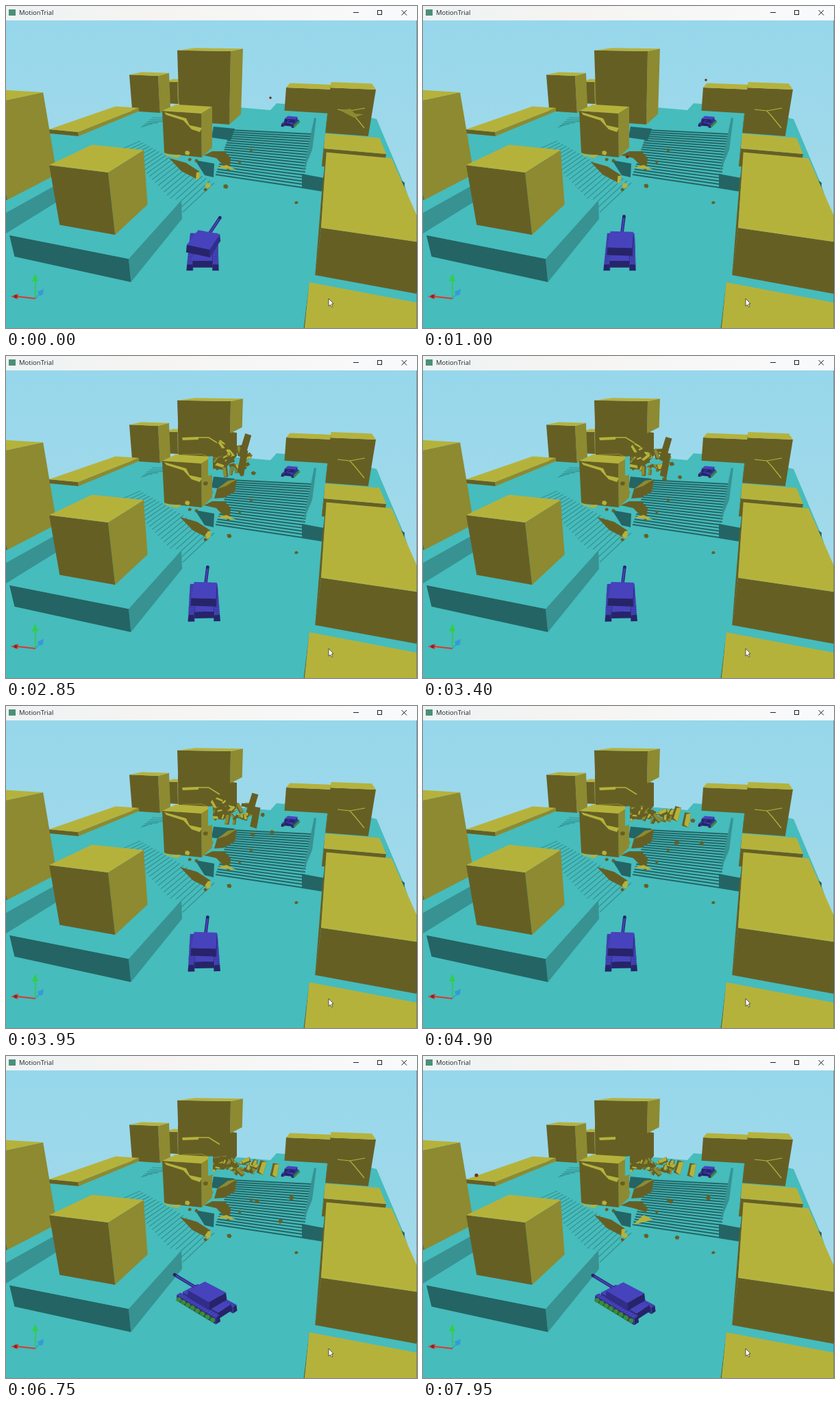
These frames come from a looping animation (600 by 470 pixels, 8 s). An HTML page with a canvas:

```html
<!DOCTYPE html>
<html lang="en">
<head>
<meta charset="utf-8">
<title>MotionTrial</title>
<style>
html, body { margin: 0; width: 100%; height: 100%; overflow: hidden; background: #9ad8ea; }
canvas { display: block; width: 600px; height: 470px; }
</style>
</head>
<body>
<canvas id="stage" width="600" height="470"></canvas>
<script>
const ctx = document.getElementById('stage').getContext('2d');
const LOOP = 8000, STEP = 50, HIT = 1500;
const LIGHT = '#b5b23c', MID = '#8d8a31', DARK = '#665f24';
const TEAL = '#46bcbc', TEAL_MID = '#389292', TEAL_DARK = '#246464';
const BLUE = '#4743bd', BLUE_MID = '#312e8a', BLUE_DARK = '#27246a', GREEN = '#3b8b35';
const SHELL = '#71301f';
const OLIVE = [LIGHT, DARK, MID], GROUND = [TEAL, TEAL_DARK, TEAL_MID], ARMOUR = [BLUE, BLUE_DARK, BLUE_MID];

// One camera for the whole scene: image centre, focal length, pitch and the
// vanishing points of depth, width and height.
const CX = 300, CY = 245, FOCAL = 529, PITCH = Math.atan(210 / FOCAL);
const SIN = Math.sin(PITCH), COS = Math.cos(PITCH);
const FAR = [480, 35], LEFT = [-1500, 35], DOWN = [300, 1580];

const clamp = v => Math.max(0, Math.min(1, v));
const mix = (a, b, p) => a + (b - a) * p;
const between = (a, b, p) => a.map((v, i) => mix(v, b[i], p));
const span = (t, from, to) => clamp((t - from) / (to - from));
const rand = n => { const v = Math.sin(n * 12.9898) * 43758.5453; return v - Math.floor(v); };
const curve = (a, b, c, p) => between(between(a, b, p), between(b, c, p), p);

function meet(a, b, c, d) {
  const ux = b[0] - a[0], uy = b[1] - a[1], vx = d[0] - c[0], vy = d[1] - c[1];
  const s = ((c[0] - a[0]) * vy - (c[1] - a[1]) * vx) / (ux * vy - uy * vx);
  return [a[0] + ux * s, a[1] + uy * s];
}
function poly(color, points) {
  ctx.fillStyle = color;
  ctx.fill(new Path2D('M' + (points.join ? points.join(' ') : points) + 'z'));
}
function stroke(color, width, points) {
  ctx.strokeStyle = color;
  ctx.lineWidth = width;
  ctx.stroke(new Path2D('M' + (points.join ? points.join(' ') : points)));
}
function dot(color, [x, y], r) {
  ctx.fillStyle = color;
  ctx.beginPath();
  ctx.arc(x, y, r, 0, 7);
  ctx.fill();
}
// Fills a face only when its corners run clockwise on screen.
function face(color, a, b, c, d) {
  if ((b[0] - a[0]) * (c[1] - a[1]) > (b[1] - a[1]) * (c[0] - a[0])) poly(color, [a, b, c, d]);
}
// Building from its near top corner, left end, depth towards FAR and lower end.
function block(x, y, leftX, depth, bottom, [top, front, side] = OLIVE) {
  const near = [x, y];
  const left = between(near, LEFT, (x - leftX) / (x - LEFT[0]));
  const right = between(near, FAR, depth);
  const back = meet(left, FAR, right, LEFT);
  const foot = between(near, DOWN, (bottom - y) / (DOWN[1] - y));
  const leftFoot = meet(left, DOWN, foot, LEFT);
  const rightFoot = meet(right, DOWN, foot, FAR);
  const backFoot = meet(back, DOWN, leftFoot, FAR);
  face(front, back, left, leftFoot, backFoot);
  face(side, near, right, rightFoot, foot);
  face(front, left, near, foot, leftFoot);
  face(top, back, right, near, left);
}
function at([x, y], turn, paint) {
  ctx.save();
  ctx.translate(x, y);
  ctx.rotate(turn);
  paint();
  ctx.restore();
}
function rock(x, y, r, turn = 0, color = DARK) {
  const points = [];
  for (let i = 0; i < 5; i++) {
    const a = turn + i * 1.257, d = r * (.75 + rand(r + x % 7 * i) * .4);
    points.push([x + Math.cos(a) * d, y + Math.sin(a) * d * .9]);
  }
  poly(color, points);
}
function stairs(count, color, width, first, last) {
  for (let i = 0; i < count; i++) {
    const p = i / (count - 1), [x1, y1, x2, y2] = between(first, last, p * (.85 + .15 * p));
    stroke(color, width, [[x1, y1], [x2, y2]]);
  }
}

function ground() {
  const sky = ctx.createLinearGradient(0, 21, 0, 320);
  sky.addColorStop(0, '#97d7eb');
  sky.addColorStop(1, '#a3daea');
  ctx.fillStyle = sky;
  ctx.fillRect(0, 0, 600, 470);
  poly(TEAL, '0,190 62,182 195,152 340,148 386,152 395,142 470,148 541,165 582,262 600,320 600,470 0,470');
  poly(TEAL_DARK, '553,238 582,258 581,270 554,262');
  block(-40, 324, -90, .215, 352, GROUND);
  block(-30, 144, -100, .165, 283);
  stairs(6, TEAL_MID, 1.2, [197, 177, 206, 174], [213, 163, 250, 164]);
  stairs(22, TEAL_MID, 1.3, [171, 208, 196, 197], [258, 301, 304, 258]);
  poly(TEAL_DARK, '303,176 334,179 328,196 300,192');
  stairs(20, TEAL_DARK, 2, [328, 181, 446, 187], [306, 246, 433, 265]);
  poly(TEAL_MID, '450,163 453,164 447,210 432,246 436,230');
  poly(TEAL_DARK, '432,245 464,251 463,271 432,266');
  poly(TEAL_DARK, '276,225 304,230 303,250 290,247');
}

function backBlocks(t) {
  block(250, 111, 232, .05, 143);
  block(222, 102, 180, .062, 156);
  block(105, 184, 63, .237, 190);
  if (t >= HIT) poly(DARK, '251,100 337,112 337,146 318,166 252,160');
  block(328, 66, 250, .118, t < HIT ? 173 : 113);
  if (t < HIT) return;
  poly(LIGHT, '257,119 281,118 281,122 258,123');
  if (t < 7200) {
    stroke(LIGHT, 1.5, '281,119 296,119 312,129');
    stroke(MID, 1.2, '257,144 285,143 300,149 322,146');
  }
}

function rightBlocks(t) {
  block(479, 122, 409, .08, 157);
  block(540, 122, 474, .1, 190);
  stroke(LIGHT, 1.2, '484,151 502,153 510,162 523,178');
  stroke(LIGHT, 1.2, '502,153 524,149');
  if (t < 500) poly(MID, '487,152 503,150 509,157 522,158 508,163');
  block(555, 216, 464, .13, 243);
  block(618, 347, 460, .4, 420);
  block(720, 569, 433, .232, 700);
}

function ruin(t) {
  block(285, 157, 228, .082, 221);
  if (t >= 1200) poly(TEAL, '295,147 302,146 302,173 295,175');
  poly(LIGHT, '231,155 263,164 268,174 286,178 283,184 271,180 259,167 234,159');
  poly(LIGHT, '229,213 240,218 255,217 251,222 236,219');
}

function looseParts(t) {
  const slide = span(t, 0, 2500), settle = span(t, 6900, 7800);
  at([261 + 16 * slide - 4 * settle, 238 + 13 * slide - 3 * settle], 0, () => {
    poly(DARK, '-23,-16 2,-9 22,4 18,15 -5,3');
    poly(LIGHT, '17,5 22,4 21,14 16,16');
  });
  poly(DARK, ['289,218 301,212 319,212 328,222', `326,${242 - 14 * settle} 307,222`]);
  poly(LIGHT, `307,${236 + 10 * settle} 322,232 336,239`);
  [[265, 214, 4], [268, 224, 3], [278, 226, 3], [295, 262, 5], [291, 268, 3]]
    .forEach(([x, y, r], i) => rock(x, y, r, i, i % 3 ? DARK : LIGHT));
  if (t > HIT + 300) {
    poly(DARK, '304,208 308,194 323,183 337,180 334,198 318,207');
    poly(MID, '308,194 324,182 337,180 321,190');
    rock(297, 200, 7, 1, MID);
    rock(291, 186, 4, 2);
  }
  rock(321 + 5 * span(t, 0, 1000), 263, 4);
  rock(358, 210, 3);
  rock(341, 228, 2.5);
  rock(424, 287, 3);
}

function shard(x, y, turn, long, wide, color) {
  at([x, y], turn, () => {
    poly(DARK, `${-long},${-wide} ${long},${-wide} ${long * .9},${wide * 1.5} ${-long},${wide * 1.3}`);
    poly(color, `${-long},${-wide} ${long},${-wide} ${long * .7},${wide * .7} ${-long * .8},${wide * .6}`);
  });
}
function debris(t) {
  if (t < HIT) return;
  const q = span(t, HIT, 5200), spread = 1 - (1 - q) ** 2, grow = span(t, HIT, HIT + 400);
  for (let i = 0; i < 32; i++) {
    const r = k => rand(i * 7 + k);
    const x = mix(306 + 38 * r(1), 298 + 68 * r(2), spread);
    const y = mix(120 + 52 * r(3), 151 + 20 * r(4), q * q);
    const long = (3 + 5 * r(5)) * grow;
    shard(x, y, r(7) * 6 + q * 3 * (r(8) - .5), long, long * (.2 + .3 * r(6)), [LIGHT, MID, LIGHT, DARK][i % 4]);
  }
  const toppled = span(t, 3500, 5000);
  const tall = mix(18, 10, toppled), color = toppled > .5 ? LIGHT : DARK;
  shard(...curve([338, 126], [352, 128], [374, 163], q), 1.85, tall, 4, color);
  shard(...curve([332, 140], [345, 165], [393, 167], q), 1.75, tall, 4, color);

  const roll = (start, via, end, stop) => {
    const [x, y] = curve(start, via, end, span(t, 2000, stop) ** 1.4);
    rock(x, y, 4, x / 9);
  };
  roll([340, 160], [404, 147], [416, 207], 6500);
  roll([345, 165], [465, 205], [371, 265], 7600);
  roll([335, 165], [395, 215], [361, 212], 7100);
}

// Local frame on the ground: x right, d forward, h up, in pixels at scale 1.
function frameAt(cx, cy, scale, yaw) {
  const s = Math.sin(yaw), c = Math.cos(yaw);
  const point = (x, d, h) => {
    const across = x * c + d * s, ahead = d * c - x * s;
    const depth = FOCAL / scale + COS * ahead - SIN * h;
    return [
      CX + FOCAL * ((cx - CX) / scale + across) / depth,
      CY + FOCAL * ((cy - CY) / scale - SIN * ahead - COS * h) / depth
    ];
  };
  const box = (x1, x2, d1, d2, h1, h2, taper = 0) => {
    const ring = (h, k) => [point(x1 + k, d2 - k, h), point(x2 - k, d2 - k, h), point(x2 - k, d1 + k, h), point(x1 + k, d1 + k, h)];
    const low = ring(h1, 0), high = ring(h2, taper);
    const [top, ends, sides] = ARMOUR;
    for (let i = 0; i < 4; i++) {
      const j = (i + 1) % 4;
      face(i % 2 ? sides : ends, high[j], high[i], low[i], low[j]);
    }
    face(top, ...high);
  };
  return { point, box };
}

function tank(cx, cy, scale, yawDeg, gunDeg) {
  const yaw = yawDeg * Math.PI / 180, gun = gunDeg * Math.PI / 180;
  const hull = frameAt(cx, cy, scale, yaw), turret = frameAt(cx + scale, cy, scale, gun);
  const near = Math.sin(yaw) < 0 ? -1 : 1;
  const tread = side => side < 0 ? hull.box(-22, -13, -41, 41, 0, 10, 1) : hull.box(13, 22, -41, 41, 0, 10, 1);
  tread(-near);
  hull.box(-14, 14, -38, 37, 3, 13, 1);
  tread(near);
  if (Math.abs(Math.sin(yaw)) > .12) {
    stroke('#2b5a38', 5 * scale, [hull.point(near * 22, -36, 4), hull.point(near * 22, 36, 4)]);
    for (let d = -35; d <= 35; d += 10) dot(GREEN, hull.point(near * 22, d, 4), 3.4 * scale);
  }
  for (let d = -38; d < 40; d += 5) {
    [-22, 13].forEach(x => stroke(BLUE_DARK, .5 * scale, [hull.point(x + 1, d, 10), hull.point(x + 8, d, 10)]));
  }
  const base = turret.point(0, 16, 20), muzzle = turret.point(0, 72, 22);
  const barrel = () => {
    stroke(BLUE_DARK, 4.6 * scale, [base, muzzle]);
    stroke(BLUE, 2.4 * scale, [base, muzzle]);
    dot(BLUE_DARK, muzzle, 2.4 * scale);
  };
  if (Math.cos(gun) > 0) barrel();
  turret.box(-18, 18, -23, 22, 12, 24, 1);
  if (Math.cos(gun) <= 0) barrel();
}

function tanks(t) {
  const drift = span(t, 1000, 2850), turn = span(t, 5400, 6700), creep = span(t, 6750, 7900);
  const gun = 20 - 17 * span(t, 0, 850) - 48 * turn;
  tank(288 + drift + 3 * turn + 2 * creep, 361 + drift + 2 * turn + creep, 1, -1.5 * drift - 44 * turn, gun);
}

function shells(t) {
  const fly = (from, to, a, via, b, r) => {
    if (t >= from && t <= to) dot(SHELL, curve(a, via, b, span(t, from, to)), r);
  };
  fly(0, 2000, [386, 134], [413, 89], [440, 120], 1.8);
  fly(750, HIT, [292, 300], [298, 160], [325, 140], 2.3);
  fly(6900, 7500, [247, 315], [150, 200], [78, 174], 2.6);
  fly(7501, LOOP, [78, 174], [78, 174], [78, 174], 2.6);
}

function gizmo() {
  stroke('#35c94a', 1.6, '43,427 43,400');
  poly('#2fd045', '38,402 43,391 47,402');
  stroke('#e0372c', 1.8, '43,427 16,424');
  poly('#e0372c', '7,424 18,420 17,428');
  dot('#7d2a25', [14, 424], 2.4);
  stroke('#349bd8', 1.4, '43,427 49,420');
  poly('#349bd8', '46,417 55,413 54,421 49,423');
}

function windowFrame() {
  const bar = ctx.createLinearGradient(0, 0, 600, 0);
  bar.addColorStop(0, '#eef3f4');
  bar.addColorStop(.35, '#f5f4f2');
  bar.addColorStop(1, '#f9fafc');
  ctx.fillStyle = bar;
  ctx.fillRect(0, 0, 600, 21);
  ctx.fillStyle = '#4b8f78';
  ctx.fillRect(4, 5, 10, 9);
  ctx.fillStyle = '#222';
  ctx.font = '9.5px "Open Sans", sans-serif';
  ctx.fillText('MotionTrial', 19, 13);
  stroke('#222', 1, '507,9.5 515,9.5');
  ctx.strokeRect(542.5, 6.5, 6, 6);
  stroke('#222', 1, '577.5,6 585,13.5M585,6 577.5,13.5');
  ctx.fillStyle = 'rgba(60,70,75,.4)';
  ctx.fillRect(599, 21, 1, 449);
  const cursor = '471,427 471,438 473.5,436 475.5,439.5 477,438.7 475.3,435 478,434.5';
  poly('#fff', cursor);
  stroke('#222', .7, cursor + 'z');
}

function draw(now) {
  const t = Math.floor(now % LOOP / STEP) * STEP;
  ground();
  backBlocks(t);
  tank(415, 173, .42, 205, 205);
  debris(t);
  ruin(t);
  looseParts(t);
  rightBlocks(t);
  block(179, 369, 5, .256, 403, GROUND);
  block(149, 243, 63, .157, 334);
  tanks(t);
  shells(t);
  gizmo();
  windowFrame();
}

const start = performance.now();
function frame() {
  draw(performance.now() - start);
  requestAnimationFrame(frame);
}
frame();
</script>
</body>
</html>
```
